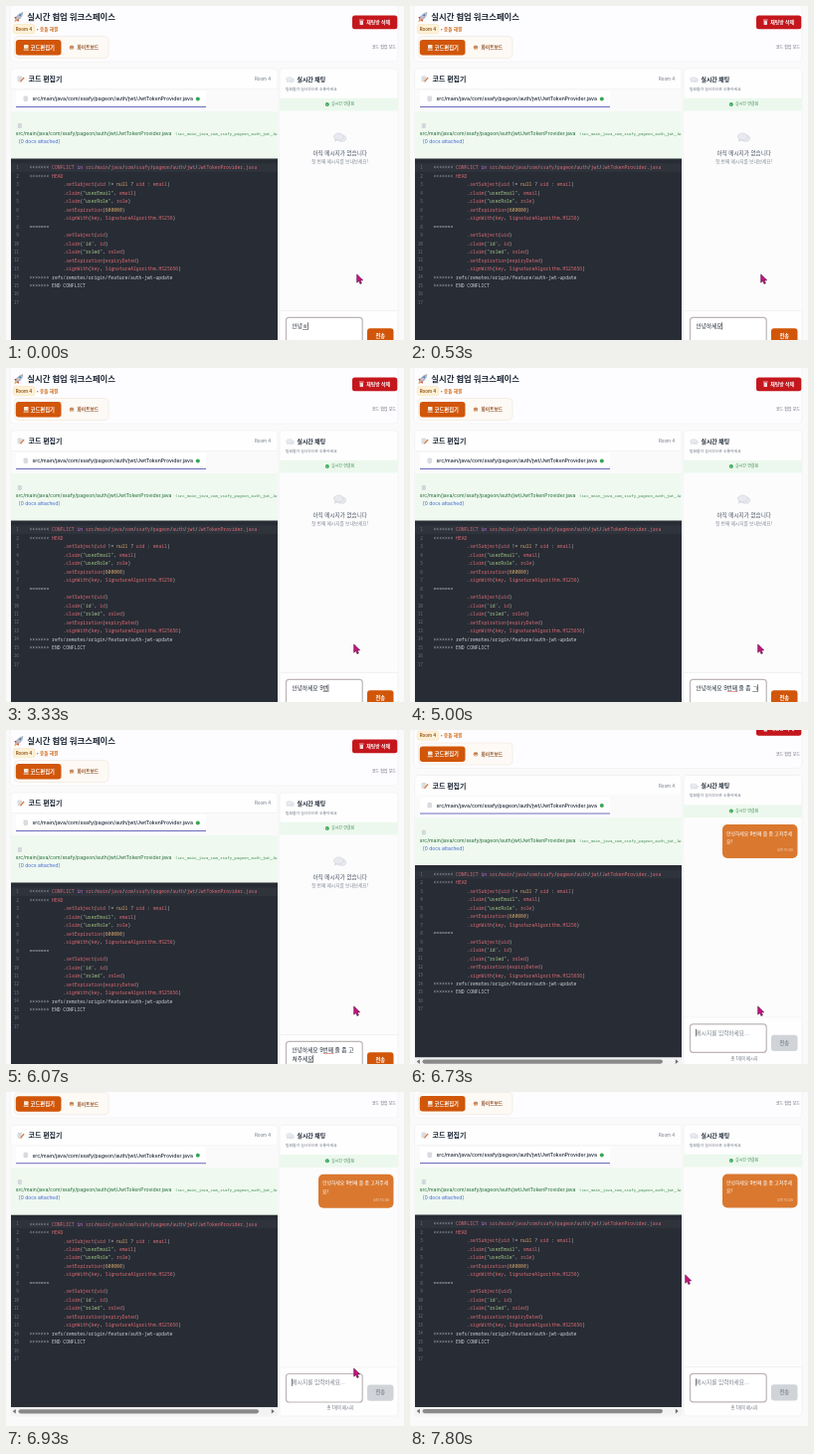
Animation, 400 px wide and 336 px high, one loop 8000 ms. Source, as an HTML page:

```html
<!DOCTYPE html>
<html lang="ko">
<head>
<meta charset="utf-8">
<style>
html, body { margin: 0; width: 100%; height: 100%; overflow: hidden; background: #fafafb; }
svg { display: block; width: 400px; height: 336px; }
text { font-family: Inter, "Noto Sans CJK KR", "Noto Sans CJK", sans-serif; white-space: pre; }
.mono { font-family: "Noto Sans Mono", "DejaVu Sans Mono", monospace; }
</style>
</head>
<body>
<svg viewBox="0 0 400 336">
  <g id="page"></g>
  <path id="mouse" d="M0 0V8.2L1.9 6.5L3.2 9.5L4.7 8.9L3.4 5.9H6Z" fill="#cb1282" stroke="#4a0c36" stroke-width=".6"/>
</svg>
<script>
const $ = id => document.getElementById(id);
const page = $('page');
const out = [];
const add = s => out.push(s);

const rect = (x, y, w, h, fill, r = 0, extra = '') =>
  add(`<rect x="${x}" y="${y}" width="${w}" height="${h}" rx="${r}" fill="${fill}" ${extra}/>`);
const line = (x1, y, x2, color, w = .6) =>
  add(`<path d="M${x1} ${y}H${x2}" stroke="${color}" stroke-width="${w}"/>`);
const path = (d, fill, extra = '') => add(`<path d="${d}" fill="${fill}" ${extra}/>`);
const dot = (x, y, r, fill) => add(`<circle cx="${x}" cy="${y}" r="${r}" fill="${fill}"/>`);
// y is the visual middle of the text
const text = (x, y, size, fill, s, weight = 400, extra = '') =>
  add(`<text x="${x}" y="${(y + size * .36).toFixed(2)}" font-size="${size}px" fill="${fill}" font-weight="${weight}" ${extra}>${s}</text>`);
const mid = 'text-anchor="middle"', end = 'text-anchor="end"';
const stroke = (c, w = .6) => `stroke="${c}" stroke-width="${w}"`;
const group = (id, build) => { add(`<g id="${id}">`); build(); add('</g>'); };
const esc = s => s.replace(/&/g, '&amp;').replace(/</g, '&lt;').replace(/>/g, '&gt;');

const file = 'src/main/java/com/ssafy/pageon/auth/jwt/JwtTokenProvider.java';

function sheet(x, y, s) {
  rect(x, y, 3.4 * s, 4.4 * s, '#f4f5f7', .4, stroke('#9aa1ab', .4));
  for (let i = 1; i < 4; i++) line(x + .7 * s, y + i * 1.1 * s, x + 2.7 * s, '#9aa1ab', .4);
}

function bubbleIcon(x, y, s) {
  add(`<g transform="translate(${x} ${y}) scale(${s})" fill="#e8eaf0" stroke="#c5c9d2" stroke-width=".4">
    <ellipse cx="1.6" cy="1" rx="3.8" ry="2.7"/><path d="M-4 1.5L-4.4 3.6L-1.8 2.3Z"/>
    <ellipse cx="-1" cy="-.5" rx="4.3" ry="3"/></g>`);
}

function header() {
  rect(4, -8, 390, 64, '#fdfcfe', 4, stroke('#efeff1'));
  path('M9 15L10.5 11Q13 7 17 6.5Q16.5 11 13 13.5Z', '#b9c0cb', stroke('#7e8794', .4));
  path('M10.5 10.5L8.2 11.5L10 13ZM13 13.5L12.4 16L10.8 14Z', '#d8343a');
  path('M10 13.2L8 16.5L11.3 14.6Z', '#f59e2b');
  dot(14.2, 9.2, 1, '#3f7fc0');
  text(21.3, 10.5, 8.4, '#1f2937', '실시간 협업 워크스페이스', 700);
  rect(7.3, 18.5, 21.7, 9.3, '#fdf1d8', 2.5, stroke('#f5dfb0', .5));
  text(18, 23.2, 4.5, '#92500e', 'Room 4', 600, mid);
  text(30.6, 23.2, 4.6, '#cf6a17', '• 충돌 해결', 600);

  rect(8.5, 30.5, 94.5, 22, '#fdf9f4', 4, stroke('#eee6de'));
  rect(9.8, 34, 45.7, 15.5, '#d1560a', 3);
  rect(18, 39, 4.5, 3.8, '#f6e6d8', .5);
  rect(17.6, 43.4, 5.3, 1.4, '#e8c6aa', .4);
  text(24.6, 41.8, 5.3, '#fff', '코드편집기', 700);
  dot(66, 41.8, 2.3, '#d99a62');
  dot(65.2, 41, .6, '#d8343a'); dot(67, 41.1, .6, '#3f7fc0'); dot(66.1, 43, .6, '#fff');
  text(71.5, 41.8, 4.7, '#8f4d20', '화이트보드', 600);
  text(392, 41.8, 4, '#6b7280', '코드 협업 모드', 400, end);

  rect(348, 9.5, 45.3, 13.7, '#c4171d', 2.5);
  rect(355.6, 14.8, 3.4, 4.2, '#f3d4d5', .5);
  line(354.9, 14, 359.7, '#f3d4d5', .8);
  text(362.3, 16.2, 4.9, '#fff', '채팅방 삭제', 700);
}

const code = `<<<<<<< CONFLICT in ${file}
<<<<<<< HEAD
            .setSubject(uid != null ? uid : email)
            .claim("userEmail", email)
            .claim("userRole", role)
            .setExpiration(600000)
            .signWith(key, SignatureAlgorithm.HS256)
=======
            .setSubject(uid)
            .claim('id', id)
            .claim("roled", roled)
            .setExpiration(expiryDated)
            .signWith(key, SignatureAlgorithm.HS25656)
>>>>>>> refs/remotes/origin/feature/auth-jwt-update
>>>>>>> END CONFLICT`.split('\n');

function paint(s) {
  if (s.startsWith('>')) return esc(s);
  return s.replace(/(["']).*?\1|[A-Za-z]\w*|\d+|[^A-Za-z\d"']+/g, w => {
    const color = /^["']/.test(w) ? '#a5c98a' : /^(\d|null)/.test(w) ? '#d9a76c'
      : w === 'in' ? '#c678dd' : /^[A-Za-z]/.test(w) ? '#d96b75' : '#b9bfca';
    return `<tspan fill="${color}">${esc(w)}</tspan>`;
  });
}

function editor() {
  rect(4.8, 63, 268, 293, '#fefefe', 3, stroke('#ececee'));
  sheet(12, 71, 1.1);
  path('M14 76L17.5 71.5L18.6 72.5L15 76.6Z', '#e0793a');
  text(22.5, 73.6, 7, '#1f2937', '코드 편집기', 600);
  text(266, 73.6, 4.4, '#6b7280', 'Room 4', 400, end);
  line(5, 83.5, 272.5, '#eeeef0');
  rect(5, 84, 267.7, 22, '#fafafb');
  rect(10, 85, 191, 17, '#fff', 2);
  sheet(18, 91, 1);
  text(26.5, 93.5, 5.18, '#1f2937', file, 500);
  dot(192.8, 93.5, 2, '#35a853');
  line(10, 101.5, 201, '#5b5bb5', .9);

  rect(5, 106, 267.7, 48, '#eff9ef');
  sheet(12.3, 118.5, .9);
  text(9.8, 128.3, 5.12, '#1f6b35', file);
  add('<svg x="0" y="120" width="272.5" height="16" viewBox="0 120 272.5 16">');
  text(170, 128.8, 3.98, '#3f8a55', '(src_main_java_com_ssafy_pageon_auth_jwt_JwtTokenProvider', 400, 'class="mono"');
  add('</svg>');
  text(13, 136.3, 4.9, '#3f63d8', '[0 docs attached]');

  rect(5, 153.5, 268, 193.5, '#282c34');
  rect(5, 158.3, 268, 8.6, '#2e333c');
  for (let i = 0; i < 17; i++) {
    const y = 162.7 + i * 8.47;
    text(13, y, 4.4, '#6b7383', i + 1, 400, `class="mono" ${end}`);
    if (!code[i]) continue;
    const s = code[i].trimStart();
    text(23.5 + (code[i].length - s.length) * 2.83, y, 4.72, '#cdd1d9', paint(s), 400, 'class="mono"');
  }
  rect(5, 347, 268, 8.5, '#f3f3f3');
  rect(12.5, 349, 241.5, 4.2, '#898989', 2.1);
  path('M9.8 348.8V353.4L6.8 351.1Z', '#6e6e6e');
  path('M266.8 348.8V353.4L269.8 351.1Z', '#6e6e6e');
}

function chat() {
  rect(275, 63, 119, 293, '#fefefe', 3, stroke('#ececee'));
  bubbleIcon(285.6, 74, .75);
  text(292.5, 73.8, 5.9, '#1f2937', '실시간 채팅', 600);
  text(281, 83.3, 3.85, '#6b7280', '팀원들과 실시간으로 소통하세요');
  rect(275.3, 92.7, 118.4, 13, '#ecf8ed');
  dot(322.8, 99, 2, '#35a853');
  path('M321.5 98.2L323 99.2L322.4 100.4Z', '#bfe6c6');
  text(327, 99, 4, '#3b8f50', '실시간 연결됨');
  rect(275.3, 105.7, 118.4, 201, '#fcfcfd');

  group('empty', () => {
    bubbleIcon(335.5, 132, 1.15);
    text(335.7, 148, 5.6, '#4b5563', '아직 메시지가 없습니다', 400, mid);
    text(335.5, 156.8, 4.7, '#858c97', '첫 번째 메시지를 보내보세요!', 400, mid);
  });
  group('sent', () => {
    rect(314, 112.5, 75.5, 34, '#da782f', 5);
    text(318, 121.5, 4.85, '#fff', '안녕하세요 9번째 줄 좀 고쳐주세', 500);
    text(318, 129.7, 4.85, '#fff', '요!', 500);
    text(385, 138.6, 3.5, '#f7d9c0', '오전 10:05', 400, end);
  });

  line(275.3, 306.5, 393.7, '#ececee');
  rect(281.5, 313.3, 76.7, 28.5, '#fff', 3, stroke('#bdb4b6', 1.2));
  text(287.6, 322.1, 5.65, '#7b818c', '메시지를 입력하세요...', 400, 'id="hint"');
  text(287.6, 322.1, 5.65, '#1f2937', '', 400, 'id="row0"');
  text(287.6, 331, 5.65, '#1f2937', '', 400, 'id="row1"');
  rect(319, 325.4, 10.4, .6, '#d8574f', 0, 'id="spell"');
  rect(0, 0, .6, 7.4, '#222', 0, 'id="caret"');
  rect(0, 0, 5, .5, '#333', 0, 'id="under"');
  rect(363, 324.2, 26.5, 16.3, '#d1560a', 3, 'id="send"');
  text(376.2, 332.2, 5.2, '#fff', '전송', 600, `id="sendText" ${mid}`);
  group('count', () => text(336, 347.5, 4.2, '#6b7280', '총 1개의 메시지', 400, mid));
}

header();
editor();
chat();
page.innerHTML = out.join('');

// Each key press: time, and what the field then holds
const hi = '안녕하세요', ninth = hi + ' 9번째', ask = ninth + ' 줄 좀';
const keys = [
  [0, '안녕ㅎ'], [70, '안녕하'], [200, '안녕핫'], [270, '안녕하세'], [400, '안녕하셍'], [530, hi],
  [2130, hi + ' '], [2270, hi + ' 9'], [2400, hi + ' 9ㅂ'], [2530, hi + ' 9버'], [2870, hi + ' 9번'],
  [3670, hi + ' 9번ㅉ'], [3800, ninth], [3930, ninth + ' '], [4000, ninth + ' ㅈ'], [4130, ninth + ' 주'],
  [4200, ninth + ' 줄'], [4330, ninth + ' 줄 '], [4400, ninth + ' 줄 ㅈ'], [4470, ninth + ' 줄 조'], [4530, ask],
  [5000, ask + ' ㄱ'], [5200, ask + ' 고'], [5330, ask + ' 곷'], [5470, ask + ' 고쳐'],
  [5670, ask + ' 고쳐ㅈ'], [5800, ask + ' 고쳐주'], [5870, ask + ' 고쳐줏'], [5930, ask + ' 고쳐주세'],
  [6000, ask + ' 고쳐주셍'], [6070, ask + ' 고쳐주세요'], [6400, ask + ' 고쳐주세요!'], [6470, '']
];
const wrapAt = ask.length + 2;

const clamp = p => Math.max(0, Math.min(1, p));
const smooth = p => p * p * (3 - 2 * p);
const show = (id, on) => $(id).setAttribute('visibility', on ? 'visible' : 'hidden');
const set = (id, attrs) => { for (const k in attrs) $(id).setAttribute(k, attrs[k]); };

function draw(t) {
  const [pressed, value] = keys.findLast(k => k[0] <= t);
  const rows = [value.slice(0, wrapAt), value.slice(wrapAt)];
  rows.forEach((s, i) => $('row' + i).textContent = s);
  const r = rows[1] ? 1 : 0;
  const x = 287.4 + (rows[r] ? $('row' + r).getComputedTextLength() : 0);
  const y = 322.1 + r * 8.9;
  set('caret', { x, y: y - 3.8 });
  show('caret', (t - pressed) % 1060 < 530);
  set('under', { x: x - 5, y: y + 3.2 });
  show('under', /[가-힣ㄱ-ㅎ]$/.test(value) && value !== hi);
  show('spell', value.startsWith(ninth + ' '));

  const empty = !value;
  show('hint', empty);
  set('send', { fill: empty ? '#d0d3d8' : '#d1560a' });
  set('sendText', { fill: empty ? '#868d98' : '#fff' });

  const posted = t >= 6640;
  show('empty', !posted);
  show('sent', posted);
  show('count', posted);
  const scroll = 30 * (1 - (1 - clamp((t - 6640) / 360)) ** 3);
  set('page', { transform: `translate(0 ${-scroll})` });

  const a = smooth(clamp((t - 1130) / 740)), b = smooth(clamp((t - 7480) / 320));
  set('mouse', { transform: `translate(${352.7 - 3 * a - 73 * b} ${270 + 8 * a - 94 * b})` });
}

const start = performance.now();
function tick() {
  draw((performance.now() - start) % 8000);
  requestAnimationFrame(tick);
}
tick();
</script>
</body>
</html>
```
